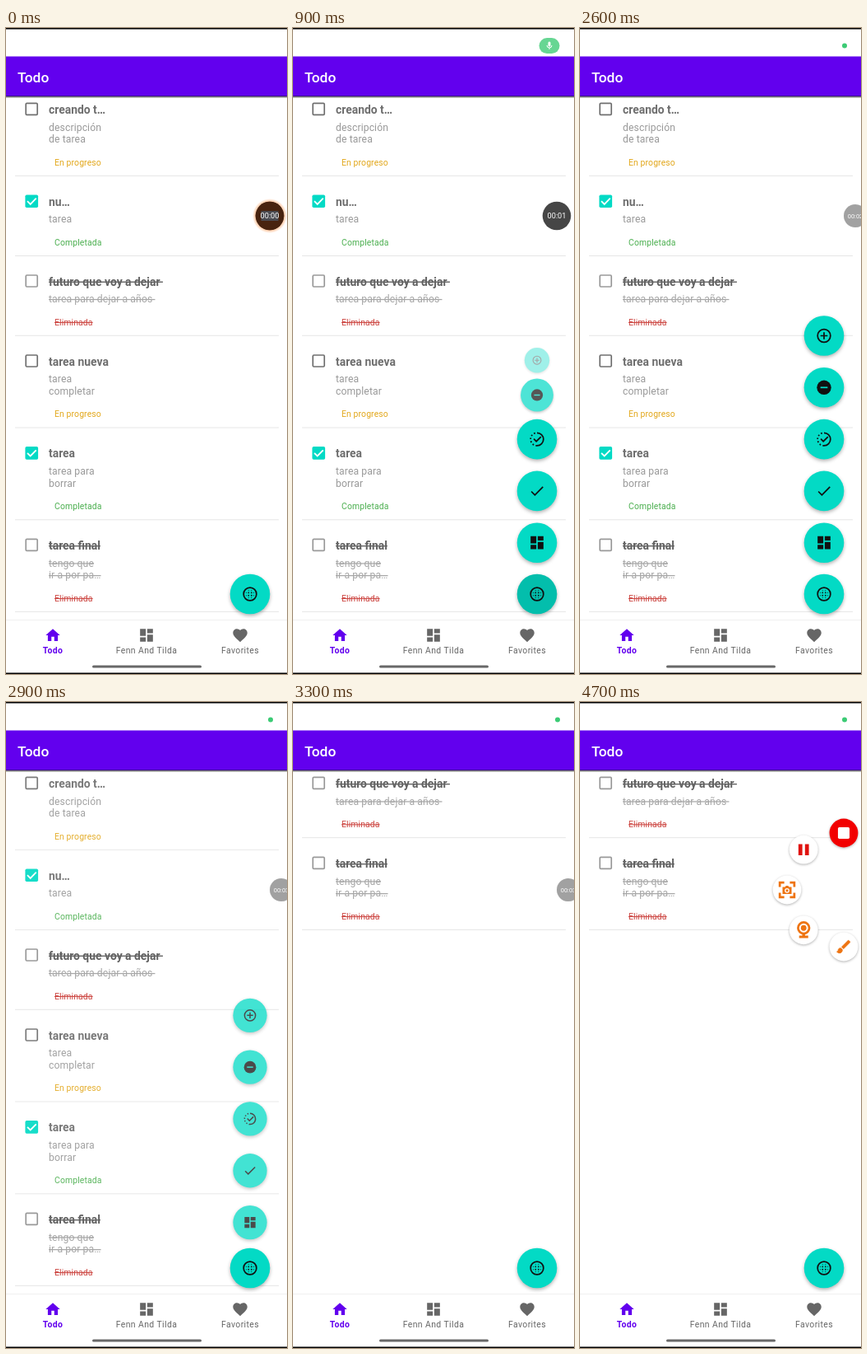
An HTML page that plays this animation: 342 by 784 pixels, repeating every 5.5 s.

```html
<!DOCTYPE html>
<html lang="es">
<head>
<meta charset="utf-8">
<title>Todo</title>
<style>
  html, body { margin: 0; width: 100%; height: 100%; overflow: hidden; background: #fff; }
  svg { display: block; width: 342px; height: 784px; font-family: Roboto, sans-serif; }
  text { white-space: pre; }
  .head { font-size: 17.4px; font-weight: 500; fill: #fff; }
  .title { font-size: 13.9px; font-weight: 700; fill: #6e6e6e; }
  .desc { font-size: 12.2px; letter-spacing: .1px; fill: #999; }
  .state { font-size: 10.45px; letter-spacing: .1px; }
  .gone text { text-decoration: line-through; }
  .gone .title { fill: #626262; }
  .gone .desc { fill: #a6a6a6; }
  .nav text { font-size: 10.45px; letter-spacing: .4px; text-anchor: middle; }
  .clock { font-size: 9.2px; fill: #fff; text-anchor: middle; }
  .fab { filter: drop-shadow(0 2px 2.2px rgba(0, 0, 0, .3)); }
  .tool { filter: drop-shadow(0 1px 1.5px rgba(0, 0, 0, .3)); }
  .line { fill: none; stroke: currentColor; stroke-width: 2; }
  .thick { stroke-width: 3.2; }
</style>
</head>
<body>
<svg id="stage" viewBox="0 0 342 784"></svg>
<script>
const LOOP = 5500, STEP = 100;
const TEAL = '#03dac5', ORANGE = '#ee7412', PURPLE = '#6200ee';

const icons = {
  home: '<path d="M10 20v-6h4v6h5v-8h3L12 3 2 12h3v8z"/>',
  board: '<path d="M3 13h8V3H3zm0 8h8v-6H3zm10 0h8V11h-8zm0-18v6h8V3z"/>',
  heart: '<path d="M12 21.35l-1.45-1.32C5.4 15.36 2 12.28 2 8.5 2 5.42 4.42 3 7.5 3c1.74 0 3.41.81 4.5 2.09C13.09 3.81 14.76 3 16.5 3 19.58 3 22 5.42 22 8.5c0 3.78-3.4 6.86-8.55 11.54z"/>',
  done: '<path class="line" d="M4.1 12.7L9 17.6 20.3 6.3"/>',
  doing: '<path class="line" d="M12 3a9 9 0 0 1 0 18"/><path class="line" stroke-dasharray="2 2.7" d="M12 21a9 9 0 0 1 0-18"/><path class="line" d="M7.5 11.5l3.5 3.5 6.5-6.5"/>',
  minus: '<circle cx="12" cy="12" r="10"/><path stroke="#03dac5" stroke-width="2" d="M7 12h10"/>',
  plus: '<circle class="line" cx="12" cy="12" r="9"/><path class="line" d="M7 12h10M12 7v10"/>',
  blur: '<circle class="line" cx="12" cy="12" r="9"/>' + dots(),
  pause: '<path fill="#e0120f" d="M4.5 4h5.6v16H4.5zm9.4 0h5.6v16h-5.6z"/>',
  stop: '<rect x="3.7" y="3.7" width="16.6" height="16.6" rx="2" fill="#fff"/>',
  shot: '<path class="line thick" d="M1.6 8V1.6H8M16 1.6h6.4V8M22.4 16v6.4H16M8 22.4H1.6V16"/><path d="M5.5 8h3.6l1.4-2h3l1.4 2h3.6v10h-13z"/><circle cx="12" cy="13" r="2.6" fill="none" stroke="#fff" stroke-width="1.6"/>',
  cam: '<circle class="line thick" cx="12" cy="9" r="8"/><circle cx="12" cy="9" r="4"/><path d="M10 17h4v3h4.5v3.5h-13V20H10z"/>',
  brush: '<path stroke="currentColor" d="M7 14c-1.66 0-3 1.34-3 3 0 1.31-1.16 2-2 2 .92 1.22 2.49 2 4 2 2.21 0 4-1.79 4-4 0-1.66-1.34-3-3-3zm13.7-9.4l-1.3-1.3a1 1 0 0 0-1.4 0L9 12.25 11.75 15l8.95-9c.4-.4.4-1 0-1.4z"/>',
  mic: '<path d="M12 14a3 3 0 0 0 3-3V5a3 3 0 0 0-6 0v6a3 3 0 0 0 3 3z"/><path class="line" d="M6 11a6 6 0 0 0 12 0M12 17v4"/>'
};

function dots() {
  const at = [7, 10, 14, 17], outer = v => v < 8 || v > 16;
  let out = '';
  for (const x of at) for (const y of at) {
    if (outer(x) && outer(y)) continue;
    out += `<circle cx="${x}" cy="${y}" r="${outer(x) || outer(y) ? .6 : 1}"/>`;
  }
  return out;
}

const icon = (name, x, y, color, scale = .87) =>
  `<g transform="translate(${x} ${y}) scale(${scale}) translate(-12 -12)" fill="${color}" color="${color}">${icons[name]}</g>`;

const states = {
  doing: ['En progreso', '#e2a71b'],
  done: ['Completada', '#4caf50'],
  gone: ['Eliminada', '#cc4540']
};

// y is the middle of the title row; end is where the row settles
const tasks = [
  { y: 99, title: 'creando t…', desc: ['descripción', 'de tarea'], state: 'doing' },
  { y: 210.8, title: 'nu…', desc: ['tarea'], state: 'done' },
  { y: 307.6, title: 'futuro que voy a dejar\u00a0', desc: ['tarea para dejar a años\u00a0'], state: 'gone', end: 99 },
  { y: 404.6, title: 'tarea nueva', desc: ['tarea', 'completar'], state: 'doing' },
  { y: 516.4, title: 'tarea', desc: ['tarea para', 'borrar'], state: 'done' },
  { y: 628, title: 'tarea final', desc: ['tengo que', 'ir a por pa…'], state: 'gone', end: 196 }
];

function checkbox(state) {
  if (state === 'done') {
    return `<rect x="23.4" y="-8.4" width="15.7" height="15.7" rx="1.8" fill="${TEAL}"/>
      <path d="M26 -.6l3.7 3.7 7-7.2" fill="none" stroke="#fff" stroke-width="1.8"/>`;
  }
  const color = state === 'gone' ? '#9a9a9a' : '#707070';
  return `<rect x="24.2" y="-7.6" width="14" height="14" rx="1.2" fill="none" stroke="${color}" stroke-width="1.7"/>`;
}

function row({ title, desc, state }) {
  const [label, color] = states[state], extra = (desc.length - 1) * 14.7;
  return `<g class="row ${state}">${checkbox(state)}
    <text class="title" x="52" y="5">${title}</text>
    ${desc.map((d, i) => `<text class="desc" x="52" y="${25.6 + i * 14.7}">${d}</text>`).join('')}
    <text class="state" x="59" y="${53.2 + extra}" fill="${color}">${label}</text>
    <path d="M11 ${65.7 + extra}H332" stroke="#e6e6e6"/></g>`;
}

const fab = (name, cls) =>
  `<g class="${cls}"><circle class="fab" r="24.3" fill="${TEAL}"/>${icon(name, 0, 0, '#101010')}</g>`;

const tab = (name, label, x, color, weight) =>
  `${icon(name, x, 737, color)}<text x="${x}" y="759" fill="${color}" font-weight="${weight}">${label}</text>`;

const tools = ['stop', 'pause', 'shot', 'cam', 'brush'];
const tool = name => `<g class="radial"><circle class="tool" r="17.4" fill="${name === 'stop' ? '#f20000' : '#fff'}"/>
  ${icon(name, 0, 0, ORANGE, .85)}</g>`;

const menu = ['board', 'done', 'doing', 'minus', 'plus'];

stage.innerHTML = `
  <defs>
    <linearGradient id="shade" x2="0" y2="1"><stop stop-opacity=".75"/><stop offset="1" stop-opacity="0"/></linearGradient>
    <radialGradient id="glow"><stop offset=".75" stop-color="#ff7a20" stop-opacity=".6"/><stop offset="1" stop-color="#ff7a20" stop-opacity="0"/></radialGradient>
  </defs>
  <rect width="342" height="784" fill="#fff"/>
  ${tasks.map(row).join('')}
  <rect width="342" height="35" fill="#fff"/>
  <rect y="34.5" width="342" height="48.5" fill="${PURPLE}"/>
  <rect y="82.5" width="342" height="3" fill="url(#shade)"/>
  <text class="head" x="13.9" y="66.4">Todo</text>
  <rect id="chip" fill="#3ccb75"/>
  <g id="mic">${icon('mic', 312, 21.5, '#fff', .5)}</g>
  <g class="nav">
    <rect y="718" width="342" height="66" fill="#fff"/>
    <path d="M0 718.5H342" stroke="#f0f0f0"/>
    ${tab('home', 'Todo', 57, PURPLE, 700)}
    ${tab('board', 'Fenn And Tilda', 171, '#666', 400)}
    ${tab('heart', 'Favorites', 285, '#666', 400)}
  </g>
  <rect x="105" y="773.5" width="133" height="3" rx="1.5" fill="#686868"/>
  ${menu.map(n => fab(n, 'item')).join('')}
  <g transform="translate(297 687)">${fab('blur', 'main')}<circle id="press" r="24.3"/></g>
  <g id="rec">
    <circle id="halo" r="21" fill="url(#glow)"/>
    <circle r="17.3" fill="#464646"/>
    <g id="warm"><circle r="17.3" fill="#48230f"/><rect x="-10.5" y="-6" width="21" height="12" fill="#4a4a50"/></g>
    <text class="clock" y="3.2"></text>
  </g>
  ${tools.map(tool).join('')}
  <path d="M0 .7H342M0 783.2H342" stroke="#000" stroke-width="1.6"/>`;

const all = sel => [...stage.querySelectorAll(sel)];
const rows = all('.row'), items = all('.item'), radials = all('.radial');
const [chip, mic, press, rec, halo, warm, clock] =
  ['#chip', '#mic', '#press', '#rec', '#halo', '#warm', '.clock'].map(s => stage.querySelector(s));

const ramp = (t, a, b) => Math.min(1, Math.max(0, (t - a) / (b - a)));
const mix = (a, b, p) => a + (b - a) * p;
const ease = p => (1 - Math.cos(Math.PI * p)) / 2;

function place(el, x, y, scale, alpha) {
  el.setAttribute('transform', `translate(${x} ${y}) scale(${scale})`);
  el.setAttribute('opacity', alpha);
}

function drawList(t) {
  const fade = 1 - ramp(t, 2890, 3010), move = ease(ramp(t, 3011, 3261));
  tasks.forEach(({ y, end }, i) =>
    end ? place(rows[i], 0, mix(y, end, move), 1, 1) : place(rows[i], 0, y, 1, fade));
}

function drawMenu(t) {
  const close = ramp(t, 2850, 3050);
  items.forEach((el, i) => {
    const start = 230 + 130 * i;
    const p = ramp(t, start, start + 400) * (1 - close);
    place(el, 297, 624.7 - 62.8 * i + 63 * (1 - p) ** 1.6, .4 + .6 * p, p);
  });
  press.setAttribute('opacity', .13 * (ramp(t, 0, 200) - ramp(t, 1000, 1400)));
}

function drawChip(t) {
  const grow = ramp(t, 300, 600), fold = ramp(t, 1200, 1450);
  const w = mix(25, 6, fold) * (.5 + .5 * grow), h = mix(19, 6, fold);
  const box = { x: mix(312, 322, fold) - w / 2, y: 21.6 - h / 2, width: w, height: h, rx: h / 2 };
  for (const k in box) chip.setAttribute(k, box[k]);
  chip.setAttribute('opacity', t < 1300 ? .78 * grow : mix(.55, 1, ramp(t, 1500, 1700)));
  mic.setAttribute('opacity', grow * (1 - ramp(t, 1200, 1350)));
}

function drawRecorder(t) {
  const dock = ramp(t, 1250, 1500) - ramp(t, 4400, 4500);
  const open = ramp(t, 4450, 4700), hot = 1 - ramp(t, 0, 300);
  place(rec, 321 + 14 * dock, 228, 1 - .19 * dock, (1 - .5 * dock) * (1 - open));
  halo.setAttribute('opacity', hot);
  warm.setAttribute('opacity', hot);
  clock.textContent = '00:0' + [500, 1600, 2900, 3900].filter(s => t >= s).length;
  radials.forEach((el, i) => {
    const a = Math.PI / 4 * i, r = 69 * open;
    place(el, 321 - r * Math.sin(a), 228 - r * Math.cos(a), .4 + .6 * open, open);
  });
}

function frame(now) {
  const t = Math.floor((now % LOOP) / STEP) * STEP;
  drawList(t);
  drawMenu(t);
  drawChip(t);
  drawRecorder(t);
  requestAnimationFrame(frame);
}
frame(0);
</script>
</body>
</html>
```
